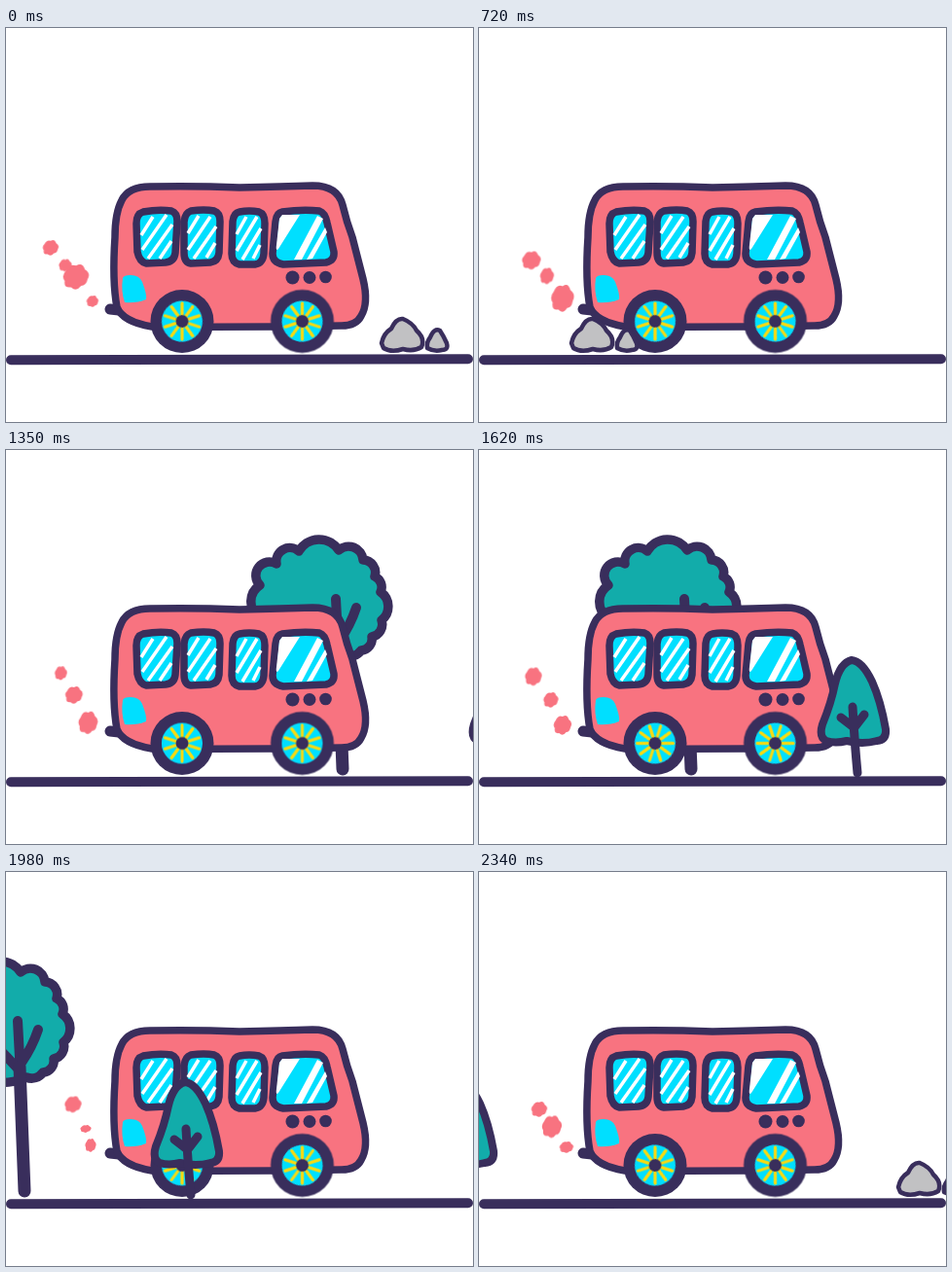
Write an HTML page without scripts that moves like this. It is 480 px wide and 405 px high and loops after 2430 ms.

```html
<!DOCTYPE html>
<html lang="en">
<head>
<meta charset="utf-8">
<title>Bus ride</title>
<style>
  html, body { margin: 0; width: 100%; height: 100%; overflow: hidden; background: #fff; }
  svg { display: block; width: 100%; height: 100%; }

  .ink { stroke: #392e5c; stroke-linecap: round; stroke-linejoin: round; }
  .line { fill: none; }
  .dark { fill: #392e5c; }
  .pink { fill: #f87380; }
  .cyan { fill: #00dfff; }
  .teal { fill: #12acaa; }
  .grey { fill: #c1c1c3; }
  .shine { fill: none; stroke: #fff; stroke-width: 3.5; }

  /* 27 poses of 90 ms; every segment advances in whole poses */
  .scroll, .puff { animation: 2430ms steps(4) infinite; }
  .scroll { animation-name: scroll; }
  .spin { animation: spin 2430ms steps(27) infinite; }
  .high { animation-name: high; }
  .mid { animation-name: mid; }
  .low { animation-name: low; }
  .extra { animation: extra 2430ms step-end infinite; }

  @keyframes scroll {
    0% { transform: translateX(0); }
    14.81% { transform: translateX(-146px); }
    29.62% { transform: translateX(-291px); }
    44.44% { transform: translateX(-416px); animation-timing-function: steps(6); }
    66.66% { transform: translateX(-672px); }
    81.48% { transform: translateX(-871px); }
    96.29% { transform: translateX(-1075px); animation-timing-function: step-end; }
    100% { transform: translateX(-1120px); }
  }
  @keyframes spin { to { transform: rotate(486deg); } }
  @keyframes high {
    0%, 100% { transform: translate(46px, 226px) scale(.8); }
    14.81% { transform: translate(57px, 239px) scale(.8, 1.4); }
    29.62% { transform: translate(54px, 239px) scale(.95); }
    44.44% { transform: translate(57px, 226px) scale(.4, .5); animation-timing-function: steps(6); }
    66.66% { transform: translate(56px, 233px) scale(.85, .95); }
    81.48% { transform: translate(69px, 239px) scale(.85); }
    96.29% { transform: translate(62px, 244px) scale(.8); animation-timing-function: step-end; }
  }
  @keyframes mid {
    0%, 100% { transform: translate(72px, 256px) scale(1.3); }
    14.81% { transform: translate(70px, 261px) scale(.85, .8); }
    29.62% { transform: translate(70px, 255px) scale(.7, .85); }
    44.44% { transform: translate(66px, 247px) scale(1); animation-timing-function: steps(6); }
    66.66% { transform: translate(74px, 257px) scale(.75, .8); }
    81.48% { transform: translate(82px, 264px) scale(.55, .4); }
    96.29% { transform: translate(75px, 262px) scale(1, 1.15); animation-timing-function: step-end; }
  }
  @keyframes low {
    0%, 100% { transform: translate(89px, 281px) scale(.6); }
    14.81% { transform: translate(88px, 283px) scale(.7, .6); }
    29.62% { transform: translate(86px, 278px) scale(1.15, 1.4); }
    44.44% { transform: translate(83px, 278px) scale(1.05, 1.35); animation-timing-function: steps(6); }
    66.66% { transform: translate(86px, 283px) scale(.9, 1); }
    81.48% { transform: translate(87px, 281px) scale(.55, .7); }
    96.29% { transform: translate(90px, 283px) scale(.7, .6); animation-timing-function: step-end; }
  }
  @keyframes extra {
    0% { opacity: 1; }
    3.7%, 100% { opacity: 0; }
  }
</style>
</head>
<body>
<svg viewBox="0 0 480 405" role="img" aria-label="A pink bus driving past rocks and trees">
  <defs>
    <path id="blob" d="M-8-5Q-5-11 0-9Q5-12 7-6Q12-3 9 2Q8 7 4 7Q0 12-4 8Q-10 9-9 3Q-12-1-8-5Z"/>

    <g id="rocks" class="ink grey" stroke-width="4.5">
      <path d="M386 324Q388 314 396 309Q401 298 408 299Q418 303 422 311Q431 319 427 328Q419 333 408 330Q396 334 388 329Z"/>
      <path d="M433 329Q432 323 436 318Q440 308 446 311Q450 317 453 324Q455 331 448 331Q440 333 433 329Z"/>
    </g>

    <g id="wheel">
      <circle class="dark" r="32.5"/>
      <g class="spin">
        <circle class="cyan" r="21"/>
        <g stroke="#f8da10" stroke-width="3.2" stroke-linecap="round">
          <path id="spoke" d="M-18.500 0H18.500"/>
          <use href="#spoke" transform="rotate(36)"/>
          <use href="#spoke" transform="rotate(72)"/>
          <use href="#spoke" transform="rotate(108)"/>
          <use href="#spoke" transform="rotate(144)"/>
        </g>
        <circle class="dark" r="6.5"/>
      </g>
    </g>
  </defs>

  <rect width="480" height="405" fill="#fff"/>
  <path class="ink line" stroke-width="10" d="M5 341.2L475 340.2"/>

  <g class="scroll">
    <g class="ink" transform="translate(416)">
      <path class="teal" stroke-width="9.5" d="M389 139A14 14 0 0 1 406 117A14 14 0 0 1 429 104A24 24 0 0 1 470 103A15 15 0 0 1 495 113A13 13 0 0 1 507 130A12 12 0 0 1 513 146A18 18 0 0 1 514 175A13 13 0 0 1 504 192A12 12 0 0 1 493 206A14 14 0 0 1 476 211A60 60 0 0 1 426 211A20 20 0 0 1 401 196A18 18 0 0 1 388 172A20 20 0 0 1 389 139Z"/>
      <path class="line" stroke-width="10" d="M467 153L470 210M446 180Q456 190 466 201M488 162Q482 180 471 196"/>
      <path class="line" stroke-width="13" d="M469 200L474 328"/>
    </g>
  </g>

  <g class="pink">
    <use class="puff high" href="#blob"/>
    <use class="puff mid" href="#blob"/>
    <use class="puff low" href="#blob"/>
    <g class="extra"><use href="#blob" transform="translate(61 244) scale(.65)"/></g>
  </g>

  <g>
    <path class="ink line" stroke-width="11" d="M107 289L116 290"/>
    <path class="ink pink" stroke-width="7.5" d="M112 215Q112 190 119 177Q126 163 148 163Q195 162 240 164Q285 163 315 162Q341 162 346 182Q350 199 356 215L367 258Q373 283 365 296Q360 306 345 306Q245 308 150 307Q120 302 114 287Q109 260 112 215Z"/>
    <path class="cyan" d="M120 257Q121 254 128 254Q137 254 140 261Q145 274 144 279Q134 283 122 282Q118 271 120 257Z"/>

    <g class="ink cyan" stroke-width="7.5">
      <path d="M141 189Q157 186 170 188Q176 190 176 199L174 231Q173 240 164 241L144 242Q137 240 135 230L134 201Q134 191 141 189Z"/>
      <path d="M190 188Q204 186 214 188Q220 190 220 199L219 231Q218 240 210 241L190 242Q183 241 183 231L183 199Q184 190 190 188Z"/>
      <path d="M240 189Q250 187 260 189Q266 191 266 201L265 232Q264 242 256 243L240 243Q232 241 232 232L233 199Q234 190 240 189Z"/>
      <path d="M284 189Q305 186 322 188Q328 190 330 200L337 230Q338 239 329 241L285 243Q274 241 274 232L277 199Q278 190 284 189Z"/>
    </g>
    <path class="shine" d="M139 213L151 194M140 228L165 192M146 237L171 202M158 237L170 219
      M187 211L198 193M187 228L210 194M193 237L216 204M206 236L215 221
      M237 212L247 194M237 229L258 194M243 238L262 206M254 237L261 223"/>
    <path fill="#fff" d="M284 192H302L280 227Q277 230 278 223L281 196ZM320 193L326 196L304 238H296ZM328 205L330 210L315 237L309 238Z"/>

    <g class="dark">
      <circle cx="294.5" cy="256.5" r="7"/>
      <circle cx="312" cy="256.5" r="6.5"/>
      <circle cx="328.5" cy="256" r="6.3"/>
    </g>
    <use href="#wheel" x="181" y="301.5"/>
    <use href="#wheel" x="304.5" y="301.5"/>
  </g>

  <g class="scroll">
    <use href="#rocks"/>
    <use href="#rocks" x="1120"/>
    <g class="ink" transform="translate(672)">
      <path class="teal" stroke-width="8" d="M383 216Q394 217 404 238Q413 258 418 287Q419 298 409 299Q394 303 378 299Q366 302 357 299Q349 295 353 282Q362 260 366 240Q371 219 383 216Z"/>
      <path class="line" stroke-width="9" d="M384 264Q386 300 389 332M372 275L385 285M396 272L386 285"/>
    </g>
  </g>
</svg>
</body>
</html>
```
